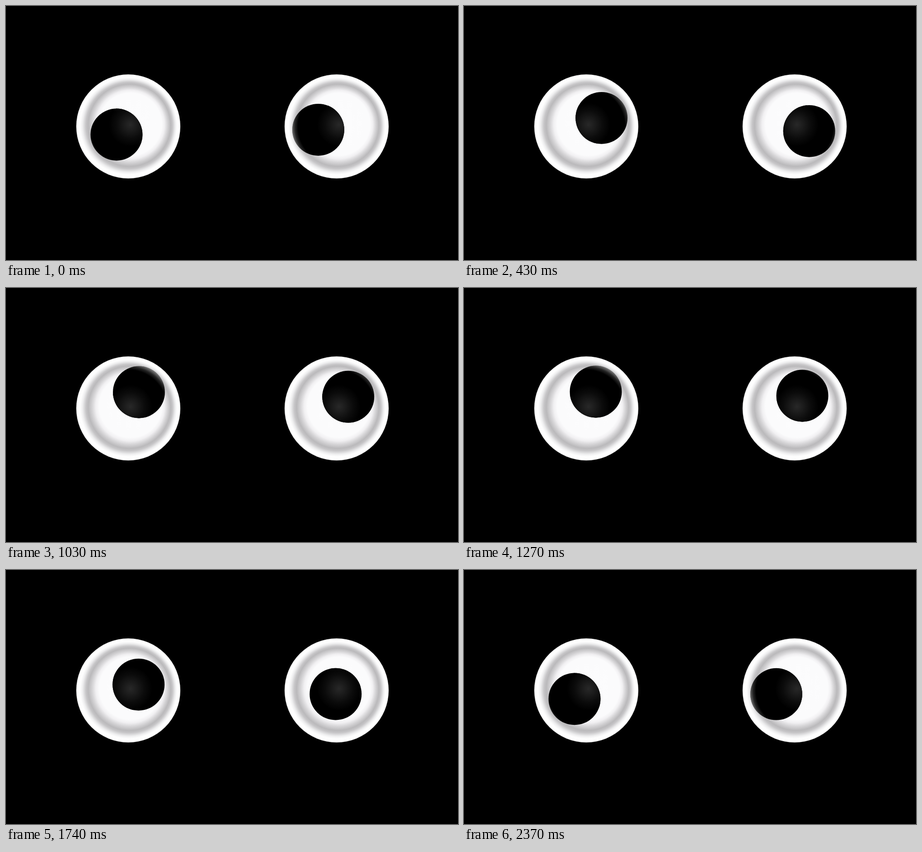
An HTML page with a canvas for the animation above (2400 ms loop, 998 px wide and 561 px high).

```html
<!DOCTYPE html>
<html lang="en">
<head>
<meta charset="utf-8">
<title>Googly eyes</title>
<style>
  html, body { margin: 0; width: 100%; height: 100%; overflow: hidden; background: #000; }
  canvas { display: block; }
</style>
</head>
<body>
<canvas id="stage" width="998" height="561"></canvas>
<script>
const ctx = document.getElementById('stage').getContext('2d');
const STEPS = 72, STEP_MS = 2400 / STEPS;
const EYE_R = 115, PUPIL_R = 57.4, MAX_OFFSET = 43;

// Pupil path of each eye: [step, x, y] relative to the eye centre
const eyes = [
  { x: 270, y: 266, path: [[0, -26, 18], [13, 33.7, -18.7], [25, 30, -28.5], [38, 21, -37],
    [46, 39, -12.7], [58, -1.5, -15], [71, -26, 18.8]] },
  { x: 730, y: 266, path: [[0, -40.5, 7.3], [13, 32.2, 10.3], [25, 31.5, -8], [38, 17, -28],
    [46, 8.5, 34], [58, -14.6, -29.5], [71, -40.5, 8.2]] }
];

function gradient(fx, fy, radius, stops) {
  const g = ctx.createRadialGradient(fx, fy, 0, 0, 0, radius);
  stops.forEach(([at, color]) => g.addColorStop(at, color));
  return g;
}

const ball = gradient(12, -12, EYE_R, [
  [0, '#fcfcfd'], [0.6, '#fbfbfc'], [0.66, '#f1f0f2'], [0.72, '#d6d5d7'], [0.79, '#bab9bb'],
  [0.83, '#c6c5c7'], [0.89, '#eeeeef'], [0.93, '#fdfdfd'], [0.985, '#fff'], [1, '#d8d8d8']
]);
const rimShine = gradient(0, 0, EYE_R, [
  [0, '#fff0'], [0.74, '#fff0'], [0.8, '#ffffff24'], [0.86, '#ffffff70'], [0.92, '#ffffffc0'], [1, '#fff']
]);
const glint = gradient(0, 0, 48, [
  [0, '#282828'], [0.3, '#1b1b1b'], [0.65, '#0b0b0b'], [1, '#000']
]);

function disc(x, y, r, fill) {
  ctx.fillStyle = fill;
  ctx.beginPath();
  ctx.arc(x, y, r, 0, 2 * Math.PI);
  ctx.fill();
}

// Smooth closed curve through the path points
function pupilAt(path, step) {
  const n = path.length;
  const point = i => {
    const [t, x, y] = path[(i + n) % n];
    return [t + STEPS * Math.floor(i / n), x, y];
  };
  const slope = (i, axis) => {
    const [a, b, c] = [point(i - 1), point(i), point(i + 1)];
    const before = b[0] - a[0], after = c[0] - b[0];
    return ((b[axis] - a[axis]) / before * after + (c[axis] - b[axis]) / after * before) / (before + after);
  };
  const i = path.findLastIndex(p => p[0] <= step);
  const a = point(i), b = point(i + 1);
  const span = b[0] - a[0], u = (step - a[0]) / span, v = 1 - u;
  const along = axis =>
    v * v * (1 + 2 * u) * a[axis] + u * u * (1 + 2 * v) * b[axis] +
    span * u * v * (v * slope(i, axis) - u * slope(i + 1, axis));
  const x = along(1), y = along(2);
  const fit = Math.min(1, MAX_OFFSET / (Math.hypot(x, y) || 1));
  return [x * fit, y * fit];
}

function drawEye({ x, y, path }, step) {
  const [px, py] = pupilAt(path, step);
  ctx.save();
  ctx.translate(x, y);
  disc(0, 0, EYE_R, ball);
  disc(px, py, PUPIL_R, '#000');
  ctx.beginPath();
  ctx.arc(px, py, PUPIL_R, 0, 2 * Math.PI);
  ctx.clip();
  ctx.save();
  ctx.translate(5, -4);
  disc(0, 0, 48, glint);
  ctx.restore();
  disc(0, 0, EYE_R, rimShine);
  ctx.restore();
}

function frame() {
  const step = Math.floor((performance.now() + 4) / STEP_MS) % STEPS;
  ctx.fillStyle = '#000';
  ctx.fillRect(0, 0, 998, 561);
  eyes.forEach(eye => drawEye(eye, step));
  requestAnimationFrame(frame);
}
frame();
</script>
</body>
</html>
```
